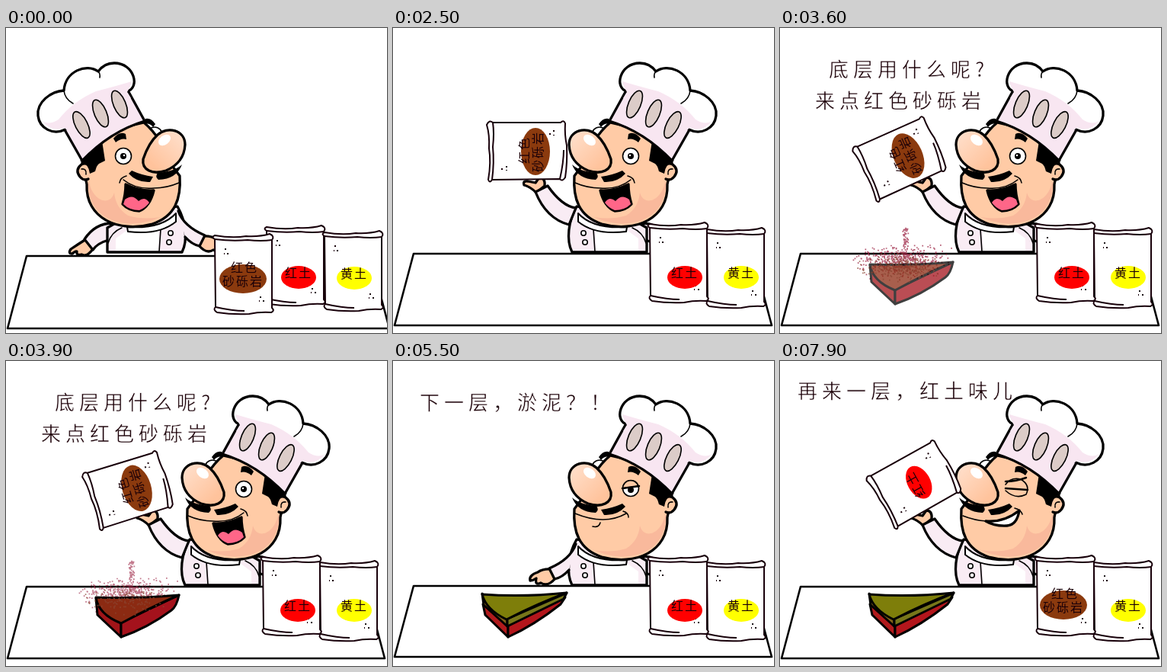
Write an HTML page that moves like this. It is 500x400 px and loops after 8000 ms.

```html
<!DOCTYPE html>
<html lang="zh">
<head>
<meta charset="utf-8">
<style>
html, body { margin: 0; width: 100%; height: 100%; overflow: hidden; background: #fff; }
svg { display: block; width: 500px; height: 400px; }
text { font-family: "Noto Sans CJK SC", "Noto Sans CJK", sans-serif; font-weight: 100; fill: #1c0008; }
.say { font-size: 26px; letter-spacing: 6px; stroke: #fff; stroke-width: .5px; }
.tag { font-size: 16px; text-anchor: middle; letter-spacing: 2px; }
.ink { stroke: #000; stroke-width: 3.3; stroke-linejoin: round; stroke-linecap: round; }
.thin { stroke: #000; stroke-width: 1.6; stroke-linecap: round; stroke-linejoin: round; }
.line { fill: none; }
.coat { fill: #f9ecf4; }
.skin { fill: #ffcba6; }
.pack { fill: #fff; stroke: #18000a; stroke-width: 2; stroke-linejoin: round; }
</style>
</head>
<body>
<svg viewBox="0 0 500 400">
  <defs>
    <linearGradient id="noseTone" x1="0" y1="0" x2="1" y2="1">
      <stop offset=".15" stop-color="#ffdcc6"/><stop offset=".8" stop-color="#ffc39c"/>
    </linearGradient>
    <g id="pack">
      <path class="pack" d="M-37-46Q-42-49-37-51Q-14-47 4-50Q22-49 35-53Q42-50 38-45L38 44Q42 48 37 50Q22 49 8 52Q-14 53-34 50Q-40 46-36 43Z"/>
      <path class="pack line" d="M-37-46Q-14-43 6-45Q24-43 38-45M-36 43Q-14 48 2 48"/>
      <path class="pack line" d="M-24-33h2m1 6h2m-6 0h1M22 30h2m2 5h2m-7 0h1"/>
    </g>
  </defs>

  <g id="chef">
    <!-- body and far arm -->
    <path class="ink skin" d="M361 277Q372 284 381 290Q385 296 379 296Q375 292 373 293Q374 299 367 297Q360 301 352 290Z"/>
    <path class="ink coat" d="M326 256Q349 256 363 277L352 291Q346 282 331 278Z"/>
    <path class="ink coat" d="M241 234C230 253 227 278 235 294H333V262L305 246Z"/>
    <path d="M266 266V292H322V276L300 260Z" fill="#fff"/>
    <path class="thin line" d="M263 264L265 293M314 262Q328 268 332 282"/>
    <path class="ink" fill="#fff" style="stroke-width:2" d="M243 243Q262 264 307 261L306 267Q265 272 243 254Z"/>
    <g class="thin" fill="#fff"><circle cx="250" cy="269" r="3.2"/><circle cx="252" cy="281" r="3.2"/></g>

    <!-- near arm, lowered or raised -->
    <g data-on="02">
      <path class="ink skin" d="M209 273Q196 272 190 277Q178 281 180 288Q184 288 188 285Q186 295 194 291Q203 297 213 285Z"/>
      <path class="ink coat" d="M240 240Q233 260 205 272L212 286Q222 284 231 274"/>
    </g>
    <g data-on="13">
      <path class="ink skin" d="M188 216Q180 208 172 206Q170 200 177 201L187 203L192 196Q200 196 199 207Z"/>
      <path class="ink coat" d="M240 236Q222 234 203 207L187 215Q201 250 231 258Z"/>
    </g>

    <!-- head -->
    <circle class="thin" cx="271" cy="140" r="10" fill="#fff"/>
    <path class="ink skin" d="M285 124C268 138 256 160 250 178L238 194C236 224 244 247 274 257C318 269 362 250 360 205L366 176L345 138Z"/>
    <path d="M358 198C354 226 330 236 324 216Q322 236 306 246Q286 252 264 248C308 268 358 252 358 205Z" fill="#f9b99c"/>
    <path class="ink skin" d="M355 184Q360 175 367 179Q376 186 369 195Q364 201 358 198"/>
    <path class="thin line" d="M361 192Q360 184 367 185"/>
    <path d="M336 174L340 148L369 174Q358 177 356 191L349 188Q347 180 344 178Z"/>

    <!-- hat -->
    <path class="ink" fill="#f8e6f1" d="M306 82L284 122Q330 136 366 174L391 130Z"/>
    <path class="ink" fill="#fff" d="M307 83C290 79 297 46 324 46Q337 46 345 57C360 46 388 56 390 82C407 83 426 97 424 115C422 132 404 141 388 133Q350 99 307 83Z"/>
    <path d="M307 84Q303 78 301 70Q328 78 348 83Q378 96 397 120Q410 128 418 122Q407 137 389 131L380 140Q340 104 302 92Z" fill="#f8e6f1"/>
    <path class="thin line" d="M345 57Q342 60 343 65M390 82Q389 93 378 99"/>
    <g class="thin" fill="#dcccc8">
      <ellipse cx="317" cy="100" rx="8" ry="19" transform="rotate(23 317 100)"/>
      <ellipse cx="342" cy="112" rx="8" ry="19" transform="rotate(23 342 112)"/>
      <ellipse cx="367" cy="127" rx="8" ry="19" transform="rotate(27 367 127)"/>
    </g>

    <!-- brows and eyes -->
    <path d="M270 126Q276 117 283 119L285 126Q277 124 273 130ZM309 139Q317 135 325 145L322 150Q315 144 308 146Z"/>
    <g data-on="01">
      <circle class="thin" cx="312" cy="168" r="10.5" fill="#fff"/><circle cx="312" cy="168" r="4"/>
      <circle cx="311" cy="167" r="1.2" fill="#fff"/>
    </g>
    <g data-on="2">
      <circle class="thin" cx="312" cy="167" r="10.5" fill="#fff"/><circle cx="312" cy="169" r="4"/>
      <path class="thin skin" d="M301.5 167A10.500 10.500 0 0 1 322 164Z"/>
      <path class="ink line" d="M301 167L323 164" style="stroke-width:2.5"/>
    </g>
    <g data-on="3">
      <path class="ink line" d="M296 158Q310 158 323 153M296 167L325 169" style="stroke-width:2.5"/>
      <path class="thin line" d="M296 162Q303 152 316 155Q329 163 323 175Q309 182 296 170"/>
    </g>

    <!-- mouth -->
    <g data-on="01">
      <path class="thin line" d="M239 203Q255 210 272 210Q296 212 312 199M308 194Q316 196 317 203"/>
      <path class="ink" d="M272 213Q292 214 309 205Q309 218 313 231Q305 240 291 240Q277 234 272 213Z"/>
      <path d="M278 229Q284 220 292 227Q300 217 310 225L312 231Q304 239 291 239Q283 236 278 229Z" fill="#ff6688"/>
    </g>
    <path data-on="2" class="thin line" d="M239 200Q278 216 306 200M262 217Q270 219 272 212M302 197Q309 199 309 205"/>
    <g data-on="3">
      <path class="ink" fill="#fff" d="M270 210Q294 212 314 196Q311 215 298 216Q282 217 270 210Z"/>
      <path class="thin line" d="M240 203Q255 209 271 210M308 193Q316 195 318 201"/>
    </g>
    <path d="M235 179Q244 188 267 190Q271 195 266 199Q242 198 235 179ZM273 195Q288 193 301 187L305 191Q294 203 277 202Z"/>
    <path class="ink" fill="url(#noseTone)" d="M231 153C231 134 254 128 267 140C277 149 282 160 286 172C288 186 274 193 256 187C242 181 232 171 231 153Z"/>
    <ellipse cx="258" cy="147" rx="9" ry="6" fill="#fff" transform="rotate(38 258 147)"/>
  </g>

  <polygon id="table" class="ink" fill="#fff" style="stroke-width:2.6"/>
  <path id="dust" fill="none" stroke="#9c2444" stroke-width="1.7"/>
  <g id="cake" class="ink" style="stroke-width:3">
    <path fill="#a01418" d="M118 311L120 333Q138 350 151 362V343Z"/>
    <path fill="#a4121c" d="M151 343L227 307Q224 322 217 327Q186 350 151 362Z"/>
    <path fill="#8b2a12" d="M118 310Q170 312 227 307Q190 323 151 344Q121 332 118 310Z"/>
  </g>
  <path id="crumbs" fill="none" stroke="#8a4632" stroke-width="1.8"/>
  <g data-on="23" class="ink" style="stroke-width:3">
    <path fill="#b01a1c" d="M118 319L121 333L151 362V345Z"/>
    <path fill="#b3161c" d="M151 347L226 310L220 319Q186 346 151 362Z"/>
    <path fill="#80601a" d="M117 305L119 320L150 348V338Z"/>
    <path fill="#77761a" d="M150 338L228 304L224 312L150 348Z"/>
    <path fill="#7e7e0a" d="M117 306Q170 310 228 304Q190 318 149 339Q122 326 117 306Z"/>
  </g>
  <g id="packs"></g>
  <g id="words"></g>
</svg>

<script>
const $ = id => document.getElementById(id);

const kinds = {
  brown: { fill: "#8b3a0e", rx: 31, ry: 19, lines: [["红色", 2, -9], ["砂砾岩", 0, 9]] },
  red: { fill: "#f00", rx: 23, ry: 15, lines: [["红土", 0, 0]] },
  yellow: { fill: "#ff0", rx: 23, ry: 15, lines: [["黄土", 0, 0]] }
};

// One sack: scenes it shows in, centre, label offset
function sack(kind, on, x, y, lx, ly, held = "") {
  const k = kinds[kind];
  const tags = k.lines.map(([s, dx, dy]) => `<text class="tag" x="${lx + dx}" y="${ly + dy}">${s}</text>`).join("");
  return `<g data-on="${on}" class="${held}" transform="translate(${x} ${y})"><use href="#pack"/>` +
    `<ellipse cx="${lx}" cy="${ly}" rx="${k.rx}" ry="${k.ry}" fill="${k.fill}"/>${tags}</g>`;
}

$("packs").innerHTML =
  sack("red", "0", 379, 312, 5, 15) +
  sack("yellow", "0", 455, 319, 2, 9) +
  sack("brown", "0", 311, 323, 0, 6) +
  sack("yellow", "123", 449, 315, 8, 12) +
  sack("red", "12", 374, 308, 9, 19) +
  sack("brown", "3", 374, 308, -2, 12) +
  sack("brown", "1", 0, 0, 0, 11, "held") +
  sack("red", "3", 0, 0, 0, 6, "held");

// scene, x, baseline, first step, glyphs at first step, glyphs per step, text
const lines = [
  [0, 195, 85, 3, 3, 1, "我来做一块地层蛋糕"],
  [1, 64, 64, 26, 3, 3, "底层用什么呢?"],
  [1, 46, 105, 28, 3, 3, "来点红色砂砾岩"],
  [2, 35, 64, 48, 1, 1, "下一层，淤泥？！"],
  [3, 23, 49, 74, 4, 1, "再来一层，红土味儿"]
];
const texts = lines.map(([, x, y]) => {
  const el = document.createElementNS("http://www.w3.org/2000/svg", "text");
  el.setAttribute("class", "say");
  el.setAttribute("x", x);
  el.setAttribute("y", y);
  return $("words").appendChild(el);
});

// Seeded grains around a heap, some of them falling from above
function specks(count, seed, y0, spread, falling) {
  let d = "";
  const rnd = () => (seed = (seed * 16807) % 2147483647) / 2147483647;
  const bell = () => rnd() + rnd() + rnd() - 1.5;
  for (let i = 0; i < count; i++) {
    const fall = falling && i % 8 === 0;
    const x = fall ? 164 + (rnd() - .5) * 7 : 160 + bell() * spread;
    const y = fall ? 262 + rnd() * 38 : y0 + bell() * spread / 3;
    d += `M${x.toFixed(1)} ${y.toFixed(1)}h1.7`;
  }
  return d;
}

// Pouring shake: alternates between two tilts
function pose(scene, k) {
  if (scene === 3) return [177, 162, -119];
  if (k < 30) return [176, 162, -90];
  if (k === 30) return [175, 162, -99];
  k = Math.min(k, 45);
  const p = Math.min(1, (k - 31) / 3);
  return k % 2 ? [173 - 12 * p, 162 + 8 * p, -107] : [173 - 15 * p, 162 + 10 * p, -114];
}

const clamp = v => Math.max(0, Math.min(1, v));
const parts = [...document.querySelectorAll("[data-on]")];
const held = [...document.querySelectorAll(".held")];
let last = -1;

function draw(k) {
  const scene = k < 25 ? 0 : k < 48 ? 1 : k < 74 ? 2 : 3;
  for (const el of parts) el.style.display = el.dataset.on.includes(scene) ? "" : "none";
  $("chef").setAttribute("transform", scene ? "" : "matrix(-1 0 0 1 466 0)");

  const [top, bottom, right] = scene === 0 ? [299, 394, 503] : scene === 2 ? [295, 388, 497] : [296, 390, 497];
  $("table").setAttribute("points", `27,${top} ${right - 25},${top} ${right},${bottom} 2,${bottom}`);

  const [x, y, turn] = pose(scene, k);
  for (const el of held) el.setAttribute("transform", `translate(${x} ${y}) rotate(${turn})`);

  const pouring = scene === 1 && k > 30;
  const flow = clamp((k - 30) / 6);
  const settle = clamp((k - 36) / 6);
  $("dust").setAttribute("d", pouring ? specks(Math.round(560 * flow), 77, 306, 30 + 22 * flow, true) : "");
  $("dust").style.opacity = .75 - .25 * settle;
  $("crumbs").setAttribute("d", pouring && k > 32 ? specks(Math.round(260 * (1 - settle)), 913, 314, 44, false) : "");
  $("crumbs").style.opacity = .7;
  $("cake").style.opacity = scene === 1 ? clamp((k - 33) / 4) : 0;

  lines.forEach(([s, , , start, first, step, str], i) => {
    const n = s === scene && k >= start ? first + (k - start) * step : 0;
    texts[i].textContent = str.slice(0, n);
  });
}

function tick() {
  const k = Math.floor(performance.now() % 8000 / 100);
  if (k !== last) draw(last = k);
  requestAnimationFrame(tick);
}
tick();
</script>
</body>
</html>
```
